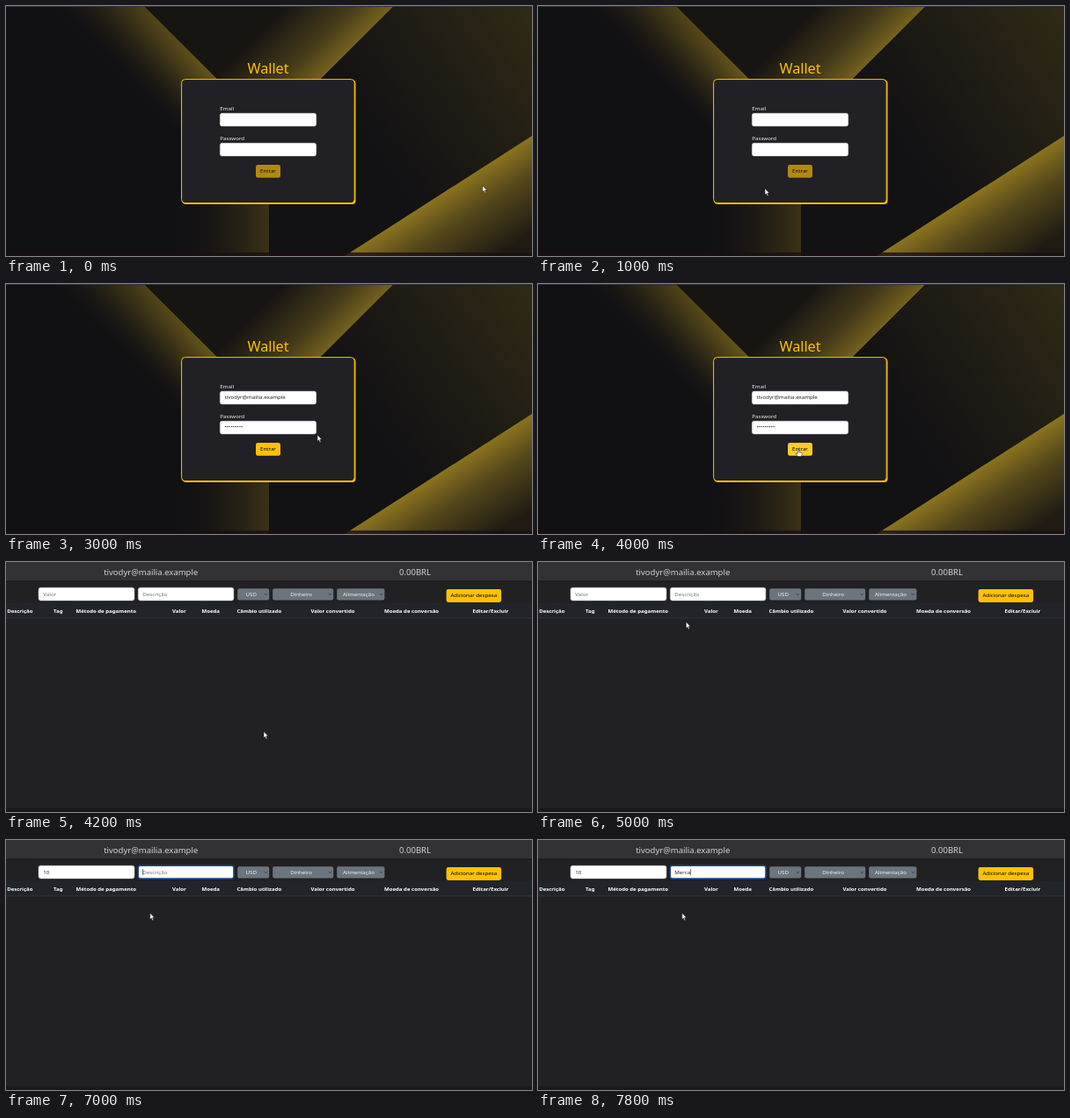
An HTML page for the animation above (8000 ms loop, 598 px wide and 285 px high).

```html
<!DOCTYPE html>
<html lang="pt">
<head>
<meta charset="utf-8">
<title>Wallet</title>
<style>
  html, body { margin: 0; width: 100%; height: 100%; overflow: hidden; background: #212023; }
  svg { display: block; width: 598px; height: 285px; }
  text { font: 6.15px "Noto Sans", "Open Sans", sans-serif; fill: #212529; white-space: pre; }
  .title { font-size: 16.2px; font-weight: 500; fill: #ffc107; }
  .label { fill: #f1f1f1; }
  .head { font-size: 9.5px; font-weight: 300; fill: #d4d4d6; }
  .th { font-size: 6.05px; font-weight: 700; fill: #fff; }
  .mid { text-anchor: middle; }
  .hint { fill: #6c757d; }
  .field { fill: #fff; stroke: #ced4da; stroke-width: .4; }
  .ring { fill: #86b7fe; stroke: #1f4a8c; stroke-width: 1.5; }
  .select { fill: #6c757d; }
  .arrow { fill: none; stroke: #343a40; stroke-width: .9; }
</style>
</head>
<body>
<svg viewBox="0 0 598 285">
  <defs>
    <linearGradient id="leftGlow" gradientUnits="userSpaceOnUse" x1="228" y1="72" x2="172" y2="128">
      <stop stop-color="#6f5c1b"/><stop offset=".35" stop-color="#3d3417"/>
      <stop offset="1" stop-color="#111013" stop-opacity="0"/>
    </linearGradient>
    <linearGradient id="topFade" gradientUnits="userSpaceOnUse" x1="0" y1="0" x2="0" y2="110">
      <stop stop-color="#111013" stop-opacity=".35"/><stop offset="1" stop-color="#111013" stop-opacity="0"/>
    </linearGradient>
    <linearGradient id="lowGlow" gradientUnits="userSpaceOnUse" x1="299" y1="0" x2="185" y2="0">
      <stop stop-color="#3b3217"/><stop offset="1" stop-color="#111013" stop-opacity="0"/>
    </linearGradient>
    <linearGradient id="topGlow" gradientUnits="userSpaceOnUse" x1="400" y1="42" x2="338" y2="-20">
      <stop stop-color="#75621d"/><stop offset=".4" stop-color="#43391a"/><stop offset="1" stop-color="#171512"/>
    </linearGradient>
    <linearGradient id="rightGlow" gradientUnits="userSpaceOnUse" x1="598" y1="20" x2="410" y2="150">
      <stop stop-color="#2e2815"/><stop offset=".5" stop-color="#1f1c14"/><stop offset="1" stop-color="#121114"/>
    </linearGradient>
    <linearGradient id="cornerGlow" gradientUnits="userSpaceOnUse" x1="490" y1="217" x2="540" y2="295">
      <stop stop-color="#8b731f"/><stop offset=".4" stop-color="#54471b"/><stop offset="1" stop-color="#1f1b13"/>
    </linearGradient>
  </defs>

  <g id="login">
    <rect width="598" height="285" fill="#111013"/>
    <path d="M0 0H157L299 142V285H0Z" fill="url(#leftGlow)"/>
    <path d="M0 0H157L240 83V110H0Z" fill="url(#topFade)"/>
    <path d="M150 205H299V285H150Z" fill="url(#lowGlow)"/>
    <path d="M157 0H441L299 142Z" fill="url(#topGlow)"/>
    <path d="M441 0H598V285H299V142Z" fill="url(#rightGlow)"/>
    <path d="M385 285L598 148V285Z" fill="url(#cornerGlow)"/>
    <rect y="281" width="598" height="4" fill="#1b1012" opacity=".8"/>
    <text class="title mid" x="298" y="76.5">Wallet</text>
    <rect x="200.5" y="84.5" width="197" height="141.5" rx="4" fill="#ffc107"/>
    <rect x="199.6" y="83.6" width="196.6" height="141" rx="4" fill="#212024" stroke="#ffc107"/>
    <text class="label" x="243.3" y="119">Email</text>
    <rect class="field" x="243.3" y="122.3" width="109.4" height="14.8" rx="2.4"/>
    <text id="email" x="248.5" y="131.3"></text>
    <text class="label" x="243.3" y="153">Password</text>
    <rect class="field" x="243.3" y="156.3" width="109.4" height="14.8" rx="2.4"/>
    <text id="password" x="248.5" y="165.4"></text>
    <g id="enter">
      <rect x="284" y="181" width="28" height="14.8" rx="2.4"/>
      <text class="mid" x="298" y="190.4" style="fill:#000">Entrar</text>
    </g>
  </g>

  <g id="wallet">
    <rect width="598" height="285" fill="#212023"/>
    <rect width="598" height="21.5" fill="#323134"/>
    <rect y="21.5" width="598" height="1" fill="#1b1a1d"/>
    <text id="user" class="head mid" x="164.7" y="14.7"></text>
    <text class="head mid" x="465" y="14.7">0.00BRL</text>
    <rect y="47" width="598" height="17" fill="#212529"/>
    <rect y="63.6" width="598" height=".7" fill="#373b3e"/>
    <rect y="280.5" width="598" height="4.5" fill="#1a181b"/>
    <g id="headings"></g>
    <g id="selects"></g>
    <rect x="500.6" y="31" width="62.5" height="15" rx="2.4" fill="#ffc107"/>
    <text class="mid" x="531.8" y="40.4" style="fill:#000">Adicionar despesa</text>
    <g id="amount">
      <rect x="37" y="29.2" width="109" height="14.8" rx="2.4"/>
      <text x="42.3" y="38.6"></text>
      <path class="caret" stroke="#222" stroke-width=".6"/>
    </g>
    <g id="detail">
      <rect x="150.3" y="29.2" width="108.6" height="14.8" rx="2.4"/>
      <text x="155.3" y="38.6"></text>
      <path class="caret" stroke="#222" stroke-width=".6"/>
    </g>
    <g id="spinner">
      <rect x="135.4" y="31.7" width="5.4" height="9.8" fill="#efefef"/>
      <path d="M136.8 35.4L138.1 33.7L139.4 35.4ZM136.8 37.9L138.1 39.6L139.4 37.9Z" fill="#505050"/>
    </g>
  </g>

  <rect width="598" height="1" fill="#2b3142"/>
  <g id="pointer" stroke="#111" stroke-width=".5" stroke-linejoin="round" fill="#fff">
    <path id="shape"/>
  </g>
</svg>

<script>
const $ = id => document.getElementById(id);
const LOOP = 8000, STEP = 200;
const USER = "tivodyr@mailia.example";

const SHAPES = {
  arrow: "M0 0V7.2L1.6 5.8L2.8 8.4L4 7.9L2.8 5.3H5Z",
  hand: "M-.8 .6Q0 -.4 .7 .6V3L3.6 3.8Q4.4 4.2 4 6L3.3 8H-.6L-2.8 4.8Q-2.2 3.9 -.8 5Z",
  beam: "M-1.3 -3.6H1.3M0 -3.6V3.6M-1.3 3.6H1.3"
};

// Each entry: time, x, y, shape (arrow by default); no position hides the pointer.
const POINTER = [
  [0, 541.8, 204.8], [200, 528, 207], [400, 470, 213], [600, 392, 218],
  [800, 316, 216], [1000, 258, 208], [1200, 236, 200],
  [1400, 215, 246], [1600, 385, 140], [1800, 575, 8], [2000],
  [2600, 465, 121], [2800, 408, 150], [3000, 354, 172], [3200, 318, 184],
  [3400, 301, 187, "hand"], [3600, 296, 188.6, "hand"],
  [4200, 293, 193.3], [4400, 275, 174], [4600, 232, 127], [4800, 188, 87], [5000, 168.3, 68.3],
  [5200, 148, 50], [5400, 126, 37, "beam"], [5600, 132, 40, "beam"],
  [5800, 158, 74], [6000, 163.8, 83.3]
];
const AMOUNT = [[0, ""], [6400, "1"], [6600, "10"]];
const DETAIL = [[0, ""], [7200, "M"], [7400, "Me"], [7600, "Merc"], [7800, "Merca"]];

const latest = (keys, t) => keys.filter(key => key[0] <= t).pop();
const show = (node, on) => node.setAttribute("visibility", on ? "visible" : "hidden");

$("user").textContent = USER;
$("headings").innerHTML = [
  [1.2, "Descrição"], [54, "Tag"], [79.5, "Método de pagamento"], [189, "Valor"], [222.5, "Moeda"],
  [262.5, "Câmbio utilizado"], [346.5, "Valor convertido"], [430, "Moeda de conversão"], [530.5, "Editar/Excluir"]
].map(([x, label]) => `<text class="th" x="${x}" y="57.6">${label}</text>`).join("");
$("selects").innerHTML = [
  [263.2, 36, 278.7, "USD"], [303.2, 69, 335.6, "Dinheiro"], [376.2, 54.2, 401, "Alimentação"]
].map(([x, width, center, label]) => `
  <rect class="select" x="${x}" y="30.2" width="${width}" height="13.4" rx="2"/>
  <text class="mid label" x="${center}" y="39.2">${label}</text>
  <path class="arrow" d="M${x + width - 5.6} 36l1.7 1.7l1.7 -1.7"/>`).join("");

function drawField(id, value, hint, focused) {
  const [box, text, caret] = $(id).children;
  box.setAttribute("class", focused ? "ring" : "field");
  box.style.fill = "#fff";
  text.textContent = value || hint;
  text.setAttribute("class", value ? "" : "hint");
  const x = +text.getAttribute("x") + (value ? text.getComputedTextLength() : 0) + .3;
  caret.setAttribute("d", `M${x} 33V40.3`);
  caret.style.display = focused ? "" : "none";
}

function draw(t) {
  const filled = t >= 2600, signedIn = t >= 4200;
  $("login").style.display = signedIn ? "none" : "";
  $("wallet").style.display = signedIn ? "" : "none";

  $("email").textContent = filled ? USER : "";
  $("password").textContent = filled ? "•".repeat(9) : "";
  $("enter").setAttribute("opacity", filled ? 1 : .65);
  $("enter").firstElementChild.setAttribute("fill", t >= 3400 ? "#ffca2c" : "#ffc107");

  const onAmount = t >= 5400 && t < 6800;
  drawField("amount", latest(AMOUNT, t)[1], "Valor", onAmount);
  drawField("detail", latest(DETAIL, t)[1], "Descrição", t >= 6800);
  $("spinner").style.display = onAmount ? "" : "none";

  const [, x, y, shape = "arrow"] = latest(POINTER, t);
  show($("pointer"), x !== undefined);
  if (x === undefined) return;
  $("pointer").setAttribute("transform", `translate(${x} ${y})`);
  $("shape").setAttribute("d", SHAPES[shape]);
}

function frame(now) {
  draw(Math.floor(now % LOOP / STEP) * STEP);
  requestAnimationFrame(frame);
}
draw(0);
requestAnimationFrame(frame);
</script>
</body>
</html>
```
